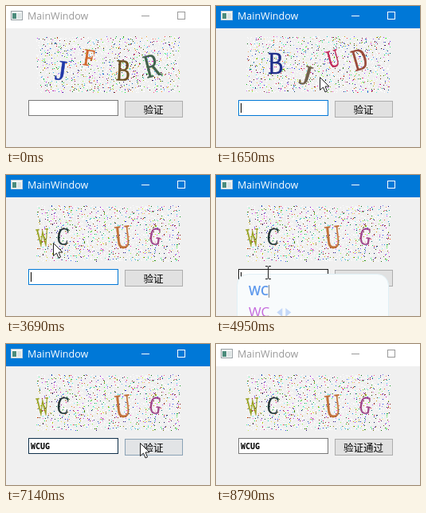
Animation, 256 px wide and 177 px high, one loop 8880 ms. Source, as an HTML page with a canvas:

```html
<!DOCTYPE html>
<html lang="zh">
<head>
<meta charset="utf-8">
<title>MainWindow</title>
<style>
  html, body { margin: 0; width: 100%; height: 100%; overflow: hidden; background: #f0f0f0; }
  canvas { display: block; width: 100vw; height: 100vh; }
</style>
</head>
<body>
<canvas id="stage" width="256" height="177"></canvas>
<script>
const ctx = document.getElementById('stage').getContext('2d');
const LOOP = 8880;
const TIMES = { active: 780, refresh: [840, 2155], shuffle: 500, drop: 3450,
  commit: 6480, press: 7560, release: 7680, inactive: 8790 };

const clamp = v => Math.min(1, Math.max(0, v));
const mix = (a, b, k) => a + (b - a) * k;
const easeOut = k => 1 - (1 - k) ** 2;
const progress = (t, start, length) => clamp((t - start) / length);
const blend = (a, b, k) => `rgb(${a.map((v, i) => Math.round(mix(v, b[i], k)))})`;

// Linear interpolation through rows of [time, ...values]
function along(rows, t) {
  let i = 0;
  while (i < rows.length - 2 && t >= rows[i + 1][0]) i++;
  const [a, b] = [rows[i], rows[i + 1]];
  const k = progress(t, a[0], b[0] - a[0]);
  return a.slice(1).map((v, j) => mix(v, b[j + 1], k));
}

function rect(x, y, w, h, color) {
  ctx.fillStyle = color;
  ctx.fillRect(x, y, w, h);
}

function frame(x, y, w, h, border, fill) {
  rect(x, y, w, h, border);
  rect(x + 1, y + 1, w - 2, h - 2, fill);
}

function text(str, x, y, font, color, align = 'left') {
  ctx.font = font;
  ctx.fillStyle = color;
  ctx.textAlign = align;
  ctx.fillText(str, x, y);
  return ctx.measureText(str).width;
}

function polygon(points, fill, stroke) {
  ctx.beginPath();
  points.forEach(([x, y]) => ctx.lineTo(x, y));
  ctx.closePath();
  ctx.fillStyle = fill;
  ctx.fill();
  if (stroke) {
    ctx.strokeStyle = stroke;
    ctx.lineWidth = 1;
    ctx.stroke();
  }
}

// Captcha: [char, center x, center y, size, degrees, color]
const captchas = [
  [['J', 69, 81, 36, 8, '#2038a8'], ['F', 104, 65, 30, 8, '#d0662c'],
   ['B', 147, 81, 38, 3, '#6a5020'], ['R', 183, 75, 42, -14, '#40604c']],
  [['B', 75, 71, 41, 0, '#1c2c88'], ['J', 113, 87, 36, 16, '#70604c'],
   ['U', 147, 66, 32, -15, '#c02858'], ['D', 180, 67, 39, -16, '#984838']],
  [['C', 71.5, 77, 31, 7, '#203434'], ['W', 105, 86, 33, -5, '#7c9c2c'],
   ['U', 146.5, 78, 42, -6, '#c07038'], ['G', 187.5, 77, 31, 7, '#a04488']]
];

let seed = 20;
function random() {
  seed = (seed * 1664525 + 1013904223) % 4294967296;
  return seed / 4294967296;
}
const dots = Array.from({ length: 2600 }, (_, i) => ({
  color: i % 3 ? '#fff' : `hsl(${random() * 360} 90% ${15 + random() * 60}%)`,
  places: captchas.map(() => [38 + random() * 180, 38 + random() * 70])
}));

function drawDots(t) {
  const second = t >= TIMES.refresh[1] ? 1 : 0;
  const k = easeOut(progress(t, TIMES.refresh[second], TIMES.shuffle));
  for (const { color, places } of dots) {
    const [from, to] = [places[second], places[second + 1]];
    rect(Math.round(mix(from[0], to[0], k)), Math.round(mix(from[1], to[1], k)), 1, 1, color);
  }
}

// Wide glyphs are condensed like a half-width serif face
function drawLetter([char, x, y, size, degrees, color]) {
  ctx.save();
  ctx.translate(x, y);
  ctx.rotate(degrees * Math.PI / 180);
  ctx.font = `${size}px "Liberation Serif", serif`;
  ctx.scale(Math.min(1, size * 0.47 / ctx.measureText(char).width), 1);
  text(char, 0, size * 0.33, ctx.font, color, 'center');
  ctx.strokeStyle = color;
  ctx.lineWidth = 0.5;
  ctx.strokeText(char, 0, size * 0.33);
  ctx.restore();
}

function drawCaptcha(t) {
  drawDots(t);
  const index = TIMES.refresh.filter(start => t >= start).length;
  captchas[index].forEach(letter => {
    if (letter[0] === 'W') {
      const [dx, dy] = along([[2940, 0, 0], [3270, -59, -7.5]], t);
      letter = [...letter];
      letter[1] += dx;
      letter[2] += dy;
      if (t >= TIMES.drop) letter[5] = '#98a020';
    }
    drawLetter(letter);
  });
}

function drawTitle(active) {
  const ink = active ? '#fff' : '#999';
  rect(0, 0, 256, 28, active ? '#0078d7' : '#fff');
  frame(6, 6, 15, 12, active ? '#c4d0d8' : '#98a0a4', '#f4f6f6');
  rect(8, 9, 5, 7, '#4c8c7c');
  rect(14, 9, 5, 7, '#dce4e4');
  text('MainWindow', 27, 17, '12.5px "Open Sans", "Noto Sans", sans-serif', ink);
  rect(170, 12, 10, 1, ink);
  ctx.strokeStyle = ink;
  ctx.lineWidth = 1;
  ctx.strokeRect(215.5, 7.5, 9, 9);
}

function drawInput(t, active) {
  const focused = active && t < TIMES.press;
  const committed = t >= TIMES.commit;
  const hover = t < 7020 ? progress(t, 3930, 120) : 1 - progress(t, 7060, 300);
  const idle = focused ? [0, 120, 215] : [122, 122, 122];
  frame(28, 118, 113, 20, blend(idle, [23, 23, 23], hover), '#fff');
  if (committed) text('WCUG', 31, 132, 'bold 10px "DejaVu Sans Mono", monospace', '#000');
  const phase = Math.floor((t - 1020) / 530);
  const lit = committed ? t < 6850 || t >= 7380 : phase % 2 !== 0;
  if (focused && lit) rect(committed ? 55 : 31, 122, 1, 12, '#000');
}

function drawButton(t) {
  const hover = Math.min(progress(t, 7080, 300), 1 - progress(t, 7870, 220));
  const pressed = t >= TIMES.press && t < TIMES.release;
  frame(149, 119, 73, 21,
    pressed ? '#005499' : blend([173, 173, 173], [0, 120, 215], hover),
    pressed ? '#cce4f7' : blend([225, 225, 225], [229, 241, 251], hover));
  text(t >= TIMES.release ? '验证通过' : '验证', 185, 134.5,
    '500 12.5px "Noto Sans CJK SC", "Noto Sans CJK", sans-serif', '#000', 'center');
}

function drawSuggestions(t) {
  if (t < 4620 || t >= TIMES.commit) return;
  const typed = 'WCUG'.slice(0, 1 + [4950, 5220, 6060].filter(start => t >= start).length);
  const right = t < 4950 ? 176 : along([[5220, 217], [5640, 235], [6060, 235], [6150, 255]], t)[0];
  ctx.save();
  ctx.globalAlpha = mix(0.5, 1, progress(t, 4620, 90));
  ctx.fillStyle = '#f8fbfc';
  ctx.strokeStyle = '#e0f0f6';
  ctx.lineWidth = 1;
  ctx.beginPath();
  ctx.roundRect(26.5, 124.5, right - 27, 80, 14);
  ctx.fill();
  ctx.stroke();
  const family = '"Open Sans", "Noto Sans", sans-serif';
  const width = text(typed, 41, 151, `600 16px ${family}`, '#5c98ec');
  rect(Math.round(41 + width), 138, 1, 16, '#808890');
  const end = 41 + text(typed, 41, 178, `17px ${family}`, '#c468dc');
  for (const [x, side] of [[end + 9, 1], [end + 27, -1]])
    polygon([[x, 172.5], [x + 7 * side, 167], [x + 7 * side, 178]], '#c4d8f8');
  ctx.restore();
}

const pointerPath = [
  [210, 262, 84], [480, 210, 64], [750, 197, 54], [1020, 197, 54], [1440, 137, 92],
  [1620, 137, 92], [1650, 130, 89], [2280, 130, 89], [2640, 117, 86], [2940, 117, 86],
  [3270, 58, 79], [3630, 58, 79], [4050, 65, 122], [7020, 65, 122], [7140, 168, 124],
  [7350, 182, 127], [7740, 184, 128], [7890, 205, 150], [8080, 213, 178]
];

function drawPointer(t) {
  if (t < 210 || t > 8080) return;
  const [x, y] = along(pointerPath, t).map(Math.round);
  ctx.save();
  ctx.translate(x, y);
  if (x < 141 && y >= 118) {
    rect(0, -7, 1, 15, '#202020');
    for (const end of [-8, 8]) {
      rect(-3, end, 3, 1, '#202020');
      rect(1, end, 3, 1, '#202020');
    }
  } else {
    polygon([[0.5, 0.5], [0.5, 16.5], [4.5, 13], [7, 19], [9.5, 18], [7, 12], [12, 12]], '#fff', '#202020');
  }
  ctx.restore();
}

function draw() {
  const t = performance.now() % LOOP;
  const active = t >= TIMES.active && t < TIMES.inactive;
  rect(0, 0, 256, 177, '#f0f0f0');
  drawTitle(active);
  drawCaptcha(t);
  drawInput(t, active);
  drawButton(t);
  drawSuggestions(t);
  drawPointer(t);
  requestAnimationFrame(draw);
}
draw();
</script>
</body>
</html>
```
